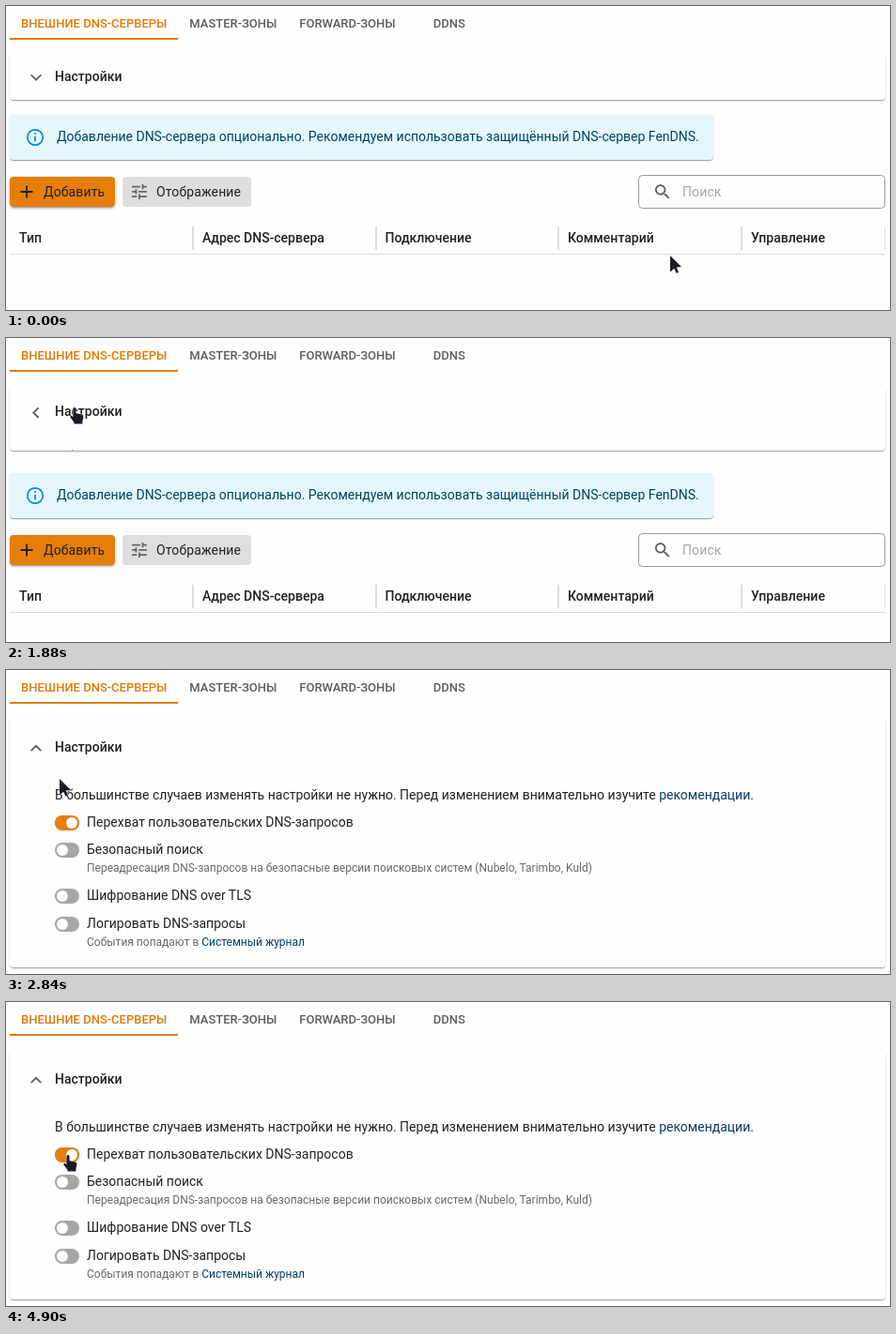
Recreate the animation shown at these times as an HTML page. Size 941 px wide and 324 px high, loop 5870 ms.

```html
<!DOCTYPE html>
<html lang="ru">
<head>
<meta charset="utf-8">
<title>DNS</title>
<style>
html, body { margin: 0; width: 100%; height: 100%; overflow: hidden; background: #fefefe; }
#stage { position: relative; width: 941px; height: 324px; overflow: hidden; font: 14px Roboto, Arial, sans-serif; }
#stage div, svg { position: absolute; left: 0; top: 0; }
svg { overflow: visible; }
text { fill: #212121; white-space: pre; }
.m { font-weight: 500; }
.tab { font-size: 13px; font-weight: 500; fill: #5f5b60; }
.btn { letter-spacing: .12px; }
.sub { font-size: 12px; fill: #686868; }
.link { fill: #043e66; }
#stage .card { left: 4px; border-radius: 4px;
  box-shadow: 0 2px 1px -1px rgba(0,0,0,.2), 0 1px 1px rgba(0,0,0,.14), 0 1px 3px rgba(0,0,0,.12); }
#stage #panel { top: 52px; width: 932px; height: 48px; overflow: hidden; background: #fefefe; }
#panel svg { left: -4px; top: -52px; }
#stage .alert { top: 116px; width: 749px; height: 48px; background: #e5f6fd; }
#stage .add { top: 182px; width: 112px; height: 32px; background: #e67e0a;
  box-shadow: 0 3px 1px -2px rgba(0,0,0,.2), 0 2px 2px rgba(0,0,0,.14), 0 1px 5px rgba(0,0,0,.12); }
#stage .view { left: 124px; top: 182px; width: 137px; height: 32px; border-radius: 4px; background: #dedede; }
.cursor path { fill: #1b1a26; stroke: #fff; stroke-width: 1; stroke-linejoin: round; paint-order: stroke; }
</style>
</head>
<body>
<div id="stage">
  <svg width="941" height="50">
    <text class="tab" x="16" y="23" style="fill:#e07a08">ВНЕШНИЕ DNS-СЕРВЕРЫ</text>
    <text class="tab" x="195.3" y="23">MASTER-ЗОНЫ</text>
    <text class="tab" x="312.3" y="23">FORWARD-ЗОНЫ</text>
    <text class="tab" x="454.8" y="23">DDNS</text>
    <path d="M4 34h179v2H4z" fill="#e07a08"/>
  </svg>

  <div id="lower">
    <div class="card alert"></div>
    <div class="card add"></div>
    <div class="view"></div>
    <svg width="941" height="324">
      <g fill="none" stroke="#0288d1" stroke-width="1.7">
        <circle cx="31" cy="140" r="8.2"/>
        <path d="M31 139v5.2M31 135.3v1.8"/>
      </g>
      <text x="54" y="144" style="fill:#014361">Добавление DNS-сервера опционально. Рекомендуем использовать защищённый DNS-сервер FenDNS.</text>
      <path d="M15.5 198h13M22 191.5v13" stroke="#221f24" stroke-width="1.8"/>
      <text class="btn" x="40" y="203">Добавить</text>
      <path transform="translate(131.4 187.4) scale(.88)" fill="#66626a" d="M3 17v2h6v-2H3zM3 5v2h10V5H3zm10 16v-2h8v-2h-8v-2h-2v6h2zM7 9v2H3v2h4v2h2V9H7zm14 4v-2H11v2h10zm-6-4h2V7h4V5h-4V3h-2v6z"/>
      <text class="btn" x="160" y="203">Отображение</text>
      <rect x="673.5" y="180.5" width="262" height="35" rx="4" fill="none" stroke="#9b989c"/>
      <path transform="translate(688.3 187.5) scale(.88)" fill="#625e66" d="M15.5 14h-.79l-.28-.27C15.41 12.59 16 11.11 16 9.5 16 5.91 13.09 3 9.5 3S3 5.91 3 9.5 5.91 16 9.5 16c1.61 0 3.09-.59 4.23-1.57l.27.28v.79l5 4.99L20.49 19l-4.99-5zm-6 0C7.01 14 5 11.99 5 9.5S7.01 5 9.5 5 14 7.01 14 9.5 11.99 14 9.5 14z"/>
      <text class="btn" x="720" y="203" style="fill:#a5a3a6">Поиск</text>
      <text class="m" x="14" y="252">Тип</text>
      <text class="m" x="209" y="252">Адрес DNS-сервера</text>
      <text class="m" x="403.5" y="252">Подключение</text>
      <text class="m" x="598" y="252">Комментарий</text>
      <text class="m" x="793" y="252">Управление</text>
      <path d="M198 235h2v25h-2zM393 235h2v25h-2zM587 235h2v25h-2zM782 235h2v25h-2zM935 235h1v25h-1zM4 264h932v1H4z" fill="#dedede"/>
      <g id="dots" fill="#66626a">
        <circle cx="179" cy="242.2" r="1.7"/><circle cx="179" cy="247.5" r="1.7"/><circle cx="179" cy="252.8" r="1.7"/>
      </g>
    </svg>
  </div>

  <div id="panel" class="card">
    <svg width="941" height="324">
      <path id="chevron" d="M-5.3 -2.6L0 2.7 5.3 -2.6" fill="none" stroke="#6a6064" stroke-width="1.9"/>
      <text id="head" class="m" x="52" y="80">Настройки</text>
      <g id="body">
        <text x="52" y="138">В большинстве случаев изменять настройки не нужно. Перед изменением внимательно изучите <tspan class="link">рекомендации</tspan>.</text>
        <g id="toggles"></g>
        <text x="86" y="167">Перехват пользовательских DNS-запросов</text>
        <text x="86" y="196">Безопасный поиск</text>
        <text class="sub" x="86" y="215">Переадресация DNS-запросов на безопасные версии поисковых систем (Nubelo, Tarimbo, Kuld)</text>
        <text x="86" y="245">Шифрование DNS over TLS</text>
        <text x="86" y="275">Логировать DNS-запросы</text>
        <text class="sub" x="86" y="294">События попадают в <tspan class="link">Системный журнал</tspan></text>
      </g>
    </svg>
  </div>

  <svg class="cursor" id="cursor" width="20" height="20">
    <path id="arrow" d="M0 0V17.5L4.2 13.8 6.6 18.8 9 17.7 6.8 12.6 12 12z"/>
    <path id="hand" d="M-1.6 1.2Q0 -1 1.6 1.2V6.2L8 7.6Q9.6 8.2 9.4 10.5L8.4 14.5V17.5H-.6V15.8L-4.6 10.6Q-5 8.6 -3.2 8.8L-1.6 10.2z"/>
    <path id="beam" d="M-2.5 -9H2.5V-8H.5V8H2.5V9H-2.5V8H-.5V-8H-2.5z"/>
  </svg>
</div>
<script>
const LOOP = 5870, STEP = 70;
// Spans in which the screen is redrawn: [first, last]
const spans = [[970, 1530], [1600, 1740], [1880, 2160], [2560, 3120], [3190, 3530], [3860, 4350], [4550, 4900]];
// Pointer path: [time, x, y]
const path = [[0, 707, 266], [900, 707, 266], [970, 604, 242], [1110, 432, 221], [1320, 216, 173], [1530, 136.5, 147],
  [1600, 110, 121], [1670, 84, 91], [1740, 73, 74], [2490, 73, 74], [2840, 57, 116], [3120, 59, 156],
  [3330, 65, 166], [3530, 66, 163], [LOOP, 66, 163]];

const $ = id => document.getElementById(id);
const ramp = (t, a, b) => Math.min(1, Math.max(0, (t - a) / (b - a)));
const moveY = (id, y) => $(id).setAttribute('transform', `translate(0 ${Math.round(y)})`);

// cubic-bezier(.4, 0, .2, 1), solved by bisection
function ease(x) {
  let lo = 0, hi = 1, u;
  for (let i = 0; i < 20; i++) {
    u = (lo + hi) / 2;
    const v = 1 - u;
    if (1.2 * v * v * u + .6 * v * u * u + u ** 3 < x) lo = u; else hi = u;
  }
  return u * u * (3 - 2 * u);
}

function redrawTime(t) {
  const span = spans.findLast(s => s[0] <= t);
  if (!span) return 0;
  const [a, b] = span;
  return t >= b ? b : a + Math.floor((t - a) / STEP) * STEP;
}

function pointer(t) {
  const i = Math.max(1, path.findIndex(p => p[0] >= t));
  const [t0, x0, y0] = path[i - 1], [t1, x1, y1] = path[i];
  const k = ramp(t, t0, t1);
  return [x0 + (x1 - x0) * k, y0 + (y1 - y0) * k];
}

function pointerKind(x, y, open) {
  const within = (l, t, r, b) => x > l && x < r && y > t && y < b;
  if (within(4, 52, 936, 100)) return 'hand';
  if (open) return within(52, 157, 78, 172) ? 'hand' : 'arrow';
  if (within(54, 129, 737, 152)) return 'beam';
  return within(4, 232, 936, 264) || within(124, 182, 261, 214) ? 'hand' : 'arrow';
}

$('toggles').innerHTML = [163, 192, 241, 271].map(y => `<g>
  <rect x="52" y="${y - 8}" width="26" height="16" rx="8" fill="#a6a6a6"/>
  <rect x="52" y="${y - 8}" width="26" height="16" rx="8" fill="#e67e0a" opacity="0"/>
  <circle cx="60" cy="${y}" r="6" fill="#fefefe"/></g>`).join('');
const toggle = $('toggles').firstElementChild;

function draw(t) {
  const grow = 217 * ease(ramp(t, 1828, 2128)), shift = ease(ramp(t, 1828, 1978));
  const open = t >= 1880;
  $('panel').style.height = Math.round(48 + grow) + 'px';
  $('lower').style.transform = `translateY(${Math.round(grow + 16 * shift)}px)`;
  moveY('head', 7 * shift);
  moveY('body', 14 * (shift - 1));
  $('body').style.visibility = open ? 'visible' : 'hidden';
  $('chevron').setAttribute('transform', `translate(32 ${76 + 7.6 * shift}) rotate(${180 * shift})`);

  const on = 1 - ramp(t, 3790, 4000) + ramp(t, 4480, 4690);
  const dim = ramp(t, 3790, 3930) - ramp(t, 4140, 4350) + ramp(t, 4480, 4620) - ramp(t, 4690, 4900);
  toggle.setAttribute('opacity', 1 - .45 * dim);
  toggle.children[1].setAttribute('opacity', on);
  toggle.children[2].setAttribute('cx', 60 + 10 * ease(on));

  const [x, y] = pointer(t), kind = pointerKind(x, y, open);
  $('cursor').style.transform = `translate(${Math.round(x)}px, ${Math.round(y)}px)`;
  for (const id of ['arrow', 'hand', 'beam']) $(id).style.display = id === kind ? '' : 'none';

  const column = Math.floor((x - 4) / 194.7);
  $('dots').style.display = !open && y > 232 && y < 264 ? '' : 'none';
  $('dots').setAttribute('transform', `translate(${column * 194.7})`);
}

function frame() {
  draw(redrawTime(performance.now() % LOOP));
  requestAnimationFrame(frame);
}
frame();
</script>
</body>
</html>
```
